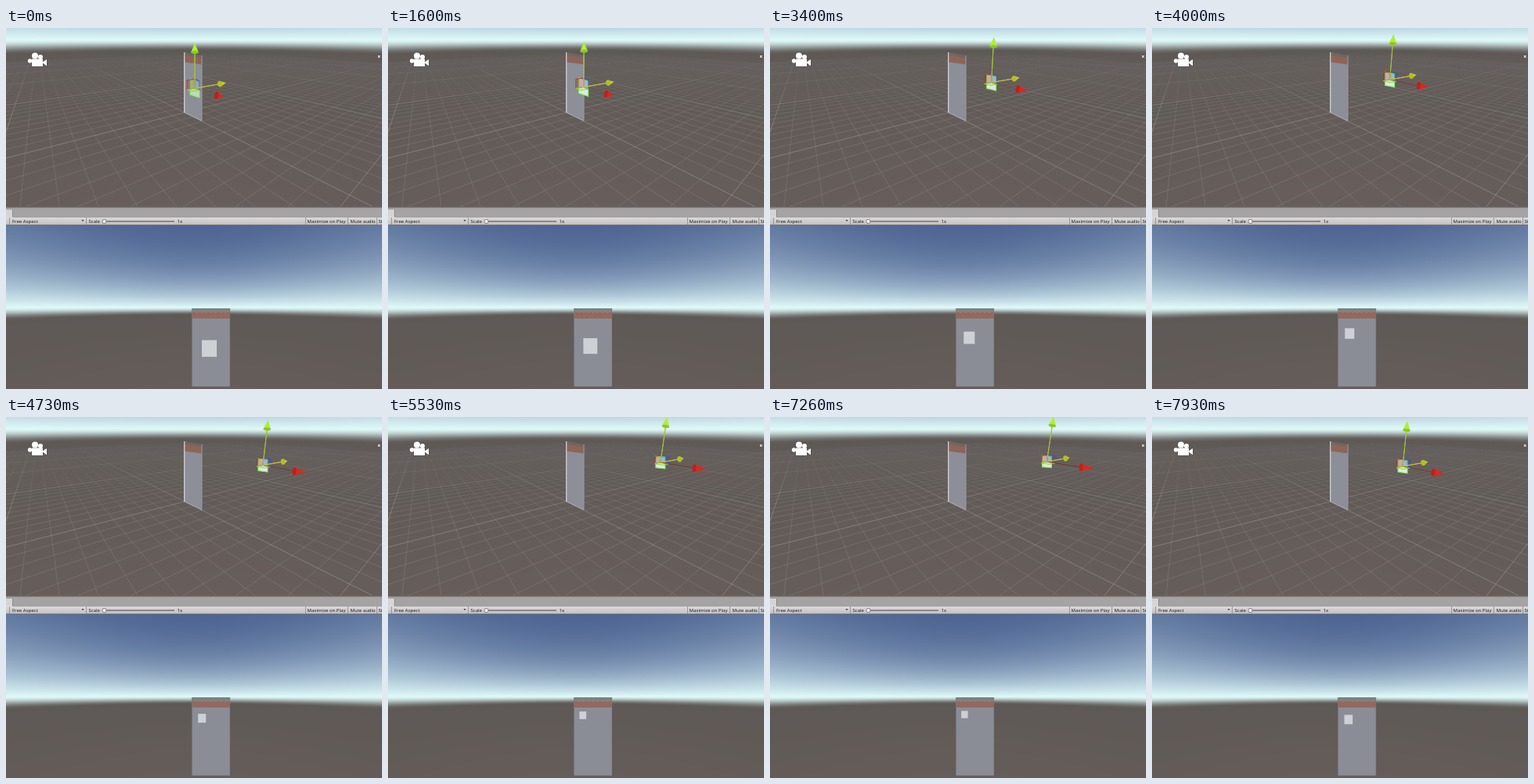
Write an HTML page with a canvas that moves like this. It is 480x461 px and loops after 8 s.

```html
<!DOCTYPE html>
<html lang="en">
<head>
<meta charset="utf-8">
<title>Scene and game view</title>
<style>
html, body { margin: 0; width: 100%; height: 100%; overflow: hidden; background: #625c58; }
canvas { display: block; }
</style>
</head>
<body>
<canvas id="stage" width="480" height="461"></canvas>
<script>
const stage = document.getElementById('stage').getContext('2d');
const backdrop = document.createElement('canvas');
backdrop.width = 480;
backdrop.height = 461;
let c = backdrop.getContext('2d');

const mix = (a, b, t) => a + (b - a) * t;
const ramp = (a, b, t) => Math.min(1, Math.max(0, (t - a) / (b - a)));
const smooth = (a, b, t) => { const u = ramp(a, b, t); return u * u * (3 - 2 * u); };

function poly(points, fill, stroke, width = 1) {
  c.beginPath();
  points.forEach(p => c.lineTo(...p));
  c.closePath();
  if (fill) { c.fillStyle = fill; c.fill(); }
  if (stroke) { c.strokeStyle = stroke; c.lineWidth = width; c.stroke(); }
}

function line(a, b, color, width = 1) {
  poly([a, b], null, color, width);
}

function rect(x, y, w, h, color) {
  c.fillStyle = color;
  c.fillRect(x, y, w, h);
}

function disc(x, y, rx, ry, color, turn = 0) {
  c.beginPath();
  c.ellipse(x, y, rx, ry, turn, 0, 7);
  c.fillStyle = color;
  c.fill();
}

function clipped(paint) {
  c.save();
  c.beginPath();
  c.rect(0, 0, 480, 228);
  c.clip();
  paint();
  c.restore();
}

// Colour by tangent of the elevation: haze thins upward, soft edge to the ground
const ZENITH = [66, 88, 138], HAZE = [222, 248, 248], GROUND = [94, 89, 86], NEAR = [105, 95, 92];

function skyColor(e, k) {
  const sky = mix(ZENITH[k], HAZE[k], Math.exp(-4.5 * Math.max(0, e)));
  return mix(sky, mix(GROUND[k], NEAR[k], ramp(0, .9, -e)), smooth(0, .055, -e));
}

function skybox(top, height, horizon, depth) {
  const img = c.createImageData(480, height);
  for (let y = 0, n = 0; y < height; y++) {
    for (let x = 0; x < 480; x++, n += 4) {
      const e = (horizon - top - y) / Math.hypot(depth, x - 240);
      for (let k = 0; k < 3; k++) img.data[n + k] = skyColor(e, k);
      img.data[n + 3] = 255;
    }
  }
  c.putImageData(img, 0, top);
}

function gridLines(vanishX, baseX, gap) {
  for (let i = -50; i <= 50; i++) {
    const fade = c.createLinearGradient(0, 30, 0, 125);
    fade.addColorStop(0, 'rgba(160,156,154,0)');
    fade.addColorStop(1, `rgba(160,156,154,${i % 10 ? .14 : .32})`);
    line([vanishX, 14], [baseX + i * gap, 228], fade, .9);
  }
}

function cameraIcon() {
  const shape = (color, grow) => {
    disc(37, 35.5, 4 + grow, 4 + grow, color);
    disc(44, 37, 3 + grow, 3 + grow, color);
    disc(30.5, 42, 2.7 + grow, 2.7 + grow, color);
    rect(33 - grow, 39.5 - grow, 14 + 2 * grow, 9.5 + 2 * grow, color);
    poly([[46, 44], [52, 40], [52, 48.5]], color, grow && color, 2 * grow);
  };
  shape('#55504e', .6);
  shape('#fff', 0);
}

function label(text, x, y = 249, color = '#222', weight = 500) {
  c.font = `${weight} 6px "Noto Sans", "Open Sans", sans-serif`;
  c.fillStyle = color;
  c.fillText(text, x, y);
}

function toolbar() {
  rect(0, 228, 480, 13, '#a5a3a4');
  rect(0, 228, 480, 1.5, '#6c6868');
  rect(0, 232, 8, 10, '#d6d4d5');
  rect(8, 232, .8, 9, '#858384');
  const shade = c.createLinearGradient(0, 241, 0, 251);
  shade.addColorStop(0, '#dedcdd');
  shade.addColorStop(1, '#c2c0c1');
  rect(0, 241, 480, 11, shade);
  rect(8, 241, 472, .7, '#8c8a8b');
  rect(0, 251, 480, 1, '#77777c');
  for (const x of [4, 102, 382, 436, 473]) rect(x, 242, .8, 9, '#8b898a');
  label('Free Aspect', 8);
  label('Scale', 105.5);
  label('1x', 218.5);
  label('Maximize on Play', 384.5);
  label('Mute audio', 439.5);
  label('Stats', 475.5);
  poly([[96.5, 245], [99.5, 245], [98, 247]], '#333');
  rect(125, 246.2, 90, 1.5, '#737172');
  disc(125.5, 247, 2.9, 2.9, '#777');
  disc(125.5, 247, 2.2, 2.2, '#eee');
}

function sceneWall() {
  // Slanted strip between heights on the left and right edges
  const strip = (l1, r1, l2, r2, color) =>
    poly([[228, l1], [250, r1], [250, r2], [228, l2]], color);
  strip(31, 35, 35, 38, '#6b6865');
  strip(34.5, 38, 43.5, 46.5, '#8f6456');
  strip(43.5, 46.5, 108, 118.5, '#8c8e98');
  line([227.7, 31], [227.7, 108], '#cfcfd1');
  line([228, 108], [250, 118.5], '#aaabb2', .7);
  line([250, 35], [250, 118], '#9b9ca4', .6);
}

function gameWall() {
  rect(237.5, 358, 48.5, 100, '#8b8d96');
  rect(237.5, 358, 48.5, 5, '#7d8280');
  rect(237.5, 363, 48.5, 8, '#93685f');
  for (let x = 240; x < 284; x += 3) rect(x, 362 + x % 2, 1.8, 1, '#a07d76');
  c.strokeStyle = '#777980';
  c.lineWidth = .6;
  c.strokeRect(237.8, 358.3, 48, 99.5);
}

function drawBackdrop() {
  skybox(0, 229, 14, 265);
  skybox(252, 209, 356, 181);
  clipped(() => {
    gridLines(40, 468, 50);
    gridLines(597, -243, 67);
  });
  sceneWall();
  cameraIcon();
  label('x', 474.5, 38, '#fff', 700);
  toolbar();
  gameWall();
}

function cone(base, tip, radius, flat, color, shadow) {
  const dx = tip[0] - base[0], dy = tip[1] - base[1], len = Math.hypot(dx, dy);
  const nx = -dy / len * radius, ny = dx / len * radius;
  poly([[base[0] + nx, base[1] + ny], tip, [base[0] - nx, base[1] - ny]], color);
  disc(...base, radius * flat, radius, shadow, Math.atan2(dy, dx));
}

function gizmo(x) {
  const k = (x - 241) / 124, y = 77 - .178 * (x - 241);
  const at = (dx, dy) => [x + dx, y + dy];

  // Object
  const h = 10 - 3 * k, s = 2 - 1.7 * k;
  poly([at(-6, -h - s), at(6, -h + s), at(6, h + s), at(-6, h - s)],
    x < 246 ? '#c3d8bd' : '#e2e8df', '#7df065', 1.1);

  // Plane handles
  const back = [-10 + 3 * k, 1.6], side = [6 + 5 * k, 2.6 - .8 * k], up = [1.5 * k, -12 + 3 * k];
  const plane = (a, b, fill, stroke) =>
    poly([at(0, 0), at(...a), at(a[0] + b[0], a[1] + b[1]), at(...b)], fill, stroke, .9);
  plane(back, up, 'rgba(150,60,50,.35)', '#a8382c');
  plane(side, up, 'rgba(60,80,160,.35)', '#3a58ae');
  plane(side, back, 'rgba(150,230,60,.25)', '#8fd63c');

  // Axes
  const lean = 9.5 * k;
  const tipY = [lean, -58], baseY = [lean * .8, -46];
  const tipZ = [40 - 12 * k, -7 + 2 * k], baseZ = [32 - 9 * k, -5.5 + 1.5 * k];
  const tipX = [37 + 25 * k, 11 - 2.5 * k], baseX = [27.5 + 18 * k, 9 - 2 * k];
  line(at(0, 0), at(...baseX), `rgba(130,44,36,${.1 + .5 * k})`, .9);
  line(at(0, 0), at(...baseY), '#a3c03c');
  line(at(0, 0), at(...baseZ), '#c0bd45');
  cone(at(...baseX), at(...tipX), 4.8, .5, '#e0261c', '#c0201a');
  cone(at(...baseZ), at(...tipZ), 3.7, .8, '#c3cc2c', '#b4bd26');
  cone(at(...baseY), at(...tipY), 4.8, .4, '#aef032', '#8cc62a');
}

// Three eased drags away, then one accelerating back
const dragX = t => 241 + 41 * smooth(930, 3200, t) + 46 * smooth(3300, 4760, t)
  + 38 * smooth(4900, 6130, t) - 46 * ramp(6540, 7930, t) ** 2;

function draw(t) {
  const x = dragX(Math.floor((t + 7) * 15 / 1000) * 1000 / 15); // 15 steps per second
  c.drawImage(backdrop, 0, 0);
  clipped(() => gizmo(x));

  // Square shrinks with distance and slides toward the vanishing point
  const w = 19 * Math.exp((241 - x) / 137), h = w * 1.12;
  rect(239.6 + w * .55, 357 + w * 2.19, w, h, '#cdd1d6');
}

drawBackdrop();
c = stage;
const start = performance.now();
function tick() {
  draw((performance.now() - start) % 8000);
  requestAnimationFrame(tick);
}
tick();
</script>
</body>
</html>
```
